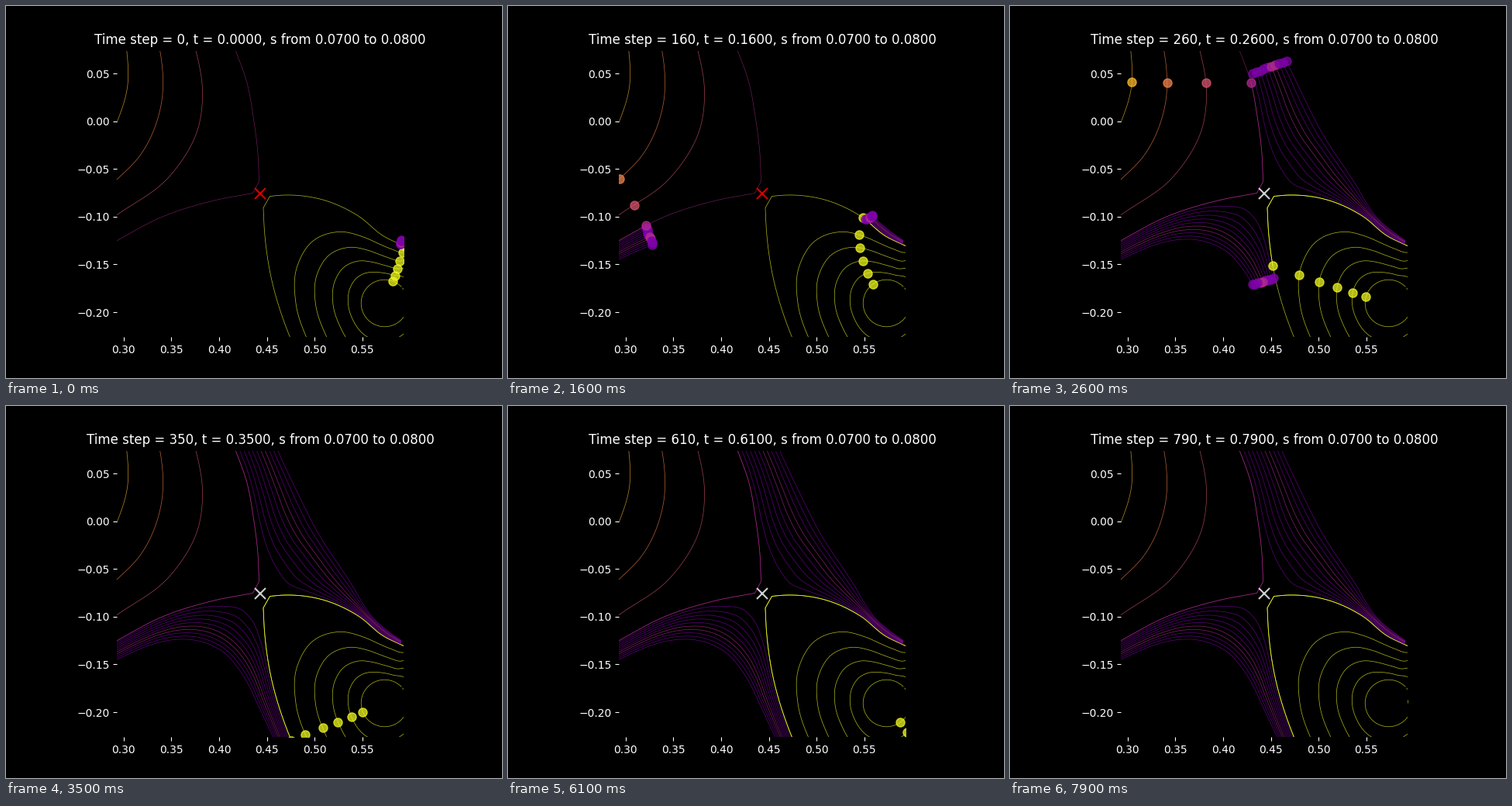
These frames come from a looping animation (640 px wide and 480 px high, 8000 ms). A matplotlib script:

```python
import numpy as np
import matplotlib.pyplot as plt
from matplotlib.animation import FuncAnimation

plt.style.use("dark_background")

W, H, DPI = 640, 480, 100
FRAMES, INTERVAL = 80, 100
CX, CY = 0.4430, -0.0761      # saddle point, centre of the view
SCALE = 1232                  # pixels per data unit
N_STREAMS = 10
FADE = 0.75
SADDLE = np.array([328, 242])
RIGHT_EDDY = np.array([488, 383])
LEFT_EDDY = np.array([71, 98])

cmap = plt.get_cmap("plasma")
yellow, magenta, purple = cmap(1.0), cmap(0.4), cmap(0.25)


def to_data(p):
    """Stage pixels (y down) to data coordinates."""
    x, y = np.asarray(p, float).T + 0.5
    return CX + (x - 328) / SCALE, CY - (y - 242.4) / SCALE


def spline(x, y, q):
    """Cubic Hermite curve through the points (x, y)."""
    m = np.gradient(y, x)
    i = np.clip(np.searchsorted(x, q) - 1, 0, len(x) - 2)
    h = x[i + 1] - x[i]
    u = (q - x[i]) / h
    return ((1 + 2 * u) * (1 - u) ** 2 * y[i] + u * (1 - u) ** 2 * h * m[i]
            + u * u * (3 - 2 * u) * y[i + 1] + u * u * (u - 1) * h * m[i + 1])


def arc(p):
    return np.r_[0, np.cumsum(np.hypot(*np.diff(p, axis=0).T))]


def smooth(*pts, n=300):
    p = np.array(pts, float)
    s = arc(p)
    q = np.linspace(0, s[-1], n)
    return np.column_stack([spline(s, v, q) for v in p.T])


def resample(p, n=7):
    s = arc(p)
    q = np.linspace(0, s[-1], n)
    return np.column_stack([np.interp(q, s, v) for v in p.T])


def lerp(p, q, u):
    return np.array(p) * (1 - u) + np.array(q) * u


# Separatrix arms, outward from the saddle
west = smooth((318, 241), (270, 250), (200, 272), (144, 301.5), (110, 321))
north = smooth((326, 226), (324.5, 190), (319, 145), (310, 97), (296.5, 59), (280, 19))
east = smooth((340, 245), (358, 243.5), (410, 250), (455, 271), (486, 296), (513.5, 309.5))
south = smooth((331.5, 260), (333, 290), (341, 347), (366, 427), (376, 450))
left = np.vstack([west[::-1], north])
right = np.vstack([east[::-1], south])

# Outermost stream of each open region
upper_edge = smooth((513, 304.5), (477, 277), (440, 221), (403, 165), (376, 112),
                    (351, 59), (334, 19))
lower_edge = smooth((110, 342), (144, 326), (190, 306.5), (240, 301), (280, 317),
                    (306, 348), (326, 388), (344.5, 427), (357, 455))

# Contours around the left eddy
gold = smooth((122, 190), (144, 146), (156, 105), (155.5, 59), (151, 30))
orange = smooth((112, 250), (144, 222), (172, 193), (200, 125), (198.5, 59), (190, 25))
rose = smooth((112, 290), (144, 268), (208, 222), (248, 155), (253, 108), (245, 59),
              (235, 25))

# Rings around the right eddy shrink from this polar outline to a circle
BEARING = np.array([45, 59, 68, 83, 96, 108, 122, 138, 156, 180, 205, 242, 270, 304, 400])
RADIUS = np.array([97, 83, 71, 70.5, 77.4, 90, 108.6, 122, 122.6, 114.5, 110, 123, 128,
                   111, 97])


def ring(u):
    deg = np.linspace(45, 400, 500)
    r = lerp(spline(BEARING, RADIUS, deg), 30.3, u)
    a = np.radians(deg)
    return RIGHT_EDDY + np.column_stack([r * np.cos(a), -r * np.sin(a)])


def stream(inflow, outflow, edge, u):
    """Stream at level u between two arms (u=0) and the edge (u=1)."""
    base = np.vstack([resample(inflow[::-1]), resample(outflow)])
    turn = np.argmin(np.hypot(*(edge - SADDLE).T))
    rim = np.vstack([resample(edge[:turn - 4]), resample(edge[turn + 4:])])
    d = np.hypot(*(base - SADDLE).T)
    w = u ** (1 - 0.5 * np.exp(-(d / 60) ** 2))
    return smooth(*lerp(base, rim, 0), n=2) if u == 0 else smooth(
        *(base + (rim - base) * w[:, None]))


class Tracer:
    """A dot on a path; where(t) gives its arc length."""

    def __init__(self, path, color, where, trail=None):
        self.path, self.s = path, arc(path)
        self.color, self.where, self.trail = color, where, trail

    def at(self, t):
        s = np.clip(self.where(t), 0, self.s[-1])
        tip = [np.interp(s, self.s, v) for v in self.path.T]
        return np.array([tip]), np.vstack([self.path[self.s < s], tip])


def orbit(path, centre, bearing):
    """Arc length at which the path is seen from centre at bearing(t)."""
    dx, dy = (path - centre).T
    seen, s = np.degrees(np.unwrap(np.arctan2(-dy, dx))), arc(path)
    return lambda t: np.interp(bearing(t), seen, s)


def travel(path, t0, p0, t1, p1, power=1):
    """Arc length growing as a power of time from p0 to p1."""
    s = arc(path)
    a, b = (s[np.argmin(np.hypot(*(path - p).T))] for p in (p0, p1))
    return lambda t: a + (b - a) * ((t - t0) / (t1 - t0)) ** power


def right_turn(u):
    """Bearing around the right eddy; outer levels lag near the saddle."""
    return lambda t: (70 + 378 * t - 6 * np.sin(2 * np.pi * t / 0.72)
                      - 13 * (1 - u) * np.exp(-((t - 0.15) / 0.07) ** 2))


def left_turn(t):
    return -60 + 600 * (t - 0.16)


contours = [(left, magenta), (right, yellow)]
tracers = []
for path, level in ((gold, 0.85), (orange, 0.7), (rose, 0.55)):
    contours.append((path, cmap(level)))
    tracers.append(Tracer(path, cmap(level), orbit(path, LEFT_EDDY, left_turn)))

for k in np.linspace(1, 0, 5):
    u = 1.27 * k - 0.27 * k * k
    path = ring(u)
    contours.append((path, yellow))
    tracers.append(Tracer(path, yellow, orbit(path, RIGHT_EDDY, right_turn(u))))

tracers.append(Tracer(right, yellow, orbit(right, RIGHT_EDDY, right_turn(-0.5)),
                      trail=(0.65, 0.9)))

for k in range(1, N_STREAMS + 1):
    u = k / N_STREAMS
    color = magenta if k in (6, 7) else purple
    up = stream(east, north, upper_edge, u)
    up = up[up[:, 0] <= 509.5]
    low = stream(west, south, lower_edge, u)
    rise = travel(up, 0, up[0], 0.26, lerp((307, 89), (358, 69), u), power=3.5)
    fall = travel(low, 0.16, lerp((177, 284), (186, 307), u),
                  0.26, lerp((340, 351), (313, 359), u))
    tracers.append(Tracer(up, color, rise, trail=(0.5, FADE)))
    tracers.append(Tracer(low, color, fall, trail=(0.5, FADE)))

tracers.append(Tracer(left, magenta, orbit(left, LEFT_EDDY, left_turn),
                      trail=(0.5, FADE)))

fig = plt.figure(figsize=(W / DPI, H / DPI), dpi=DPI)
ax = fig.add_axes([143.2 / W, 0.11, 369.6 / W, 0.77])
ax.set_xlim(CX - 0.15, CX + 0.15)
ax.set_ylim(CY - 0.15, CY + 0.15)
ax.set_xticks(np.arange(6, 12) * 0.05)
ax.set_yticks(np.arange(-4, 2) * 0.05)
ax.spines[:].set_visible(False)
title = ax.set_title("")

for path, color in contours:
    ax.plot(*to_data(path), color=color, lw=0.4 if path is left else 0.5, alpha=FADE)

trails, dots = [], []
for tr in tracers:
    lw, alpha = tr.trail or (0, 0)
    trails += ax.plot([], [], color=tr.color, lw=lw, alpha=alpha, zorder=3)
    dots += ax.plot([], [], "o", color=tr.color, ms=8, alpha=FADE, zorder=4)
cross, = ax.plot(CX, CY, "x", ms=10, mew=1.5, zorder=5)


def update(i):
    step = 10 * i
    t = step / 1000
    title.set_text(f"Time step = {step}, t = {t:.4f}, s from 0.0700 to 0.0800")
    for tr, line, dot in zip(tracers, trails, dots):
        tip, tail = tr.at(t)
        dot.set_data(*to_data(tip))
        if tr.trail:
            line.set_data(*to_data(tail))
    cross.set_color("#d90000" if t < 0.21 else "#d0d0d0")
    return [title, cross, *trails, *dots]


anim = FuncAnimation(fig, update, frames=FRAMES, interval=INTERVAL,
                     repeat=True, repeat_delay=0, blit=False)
plt.show()
```
